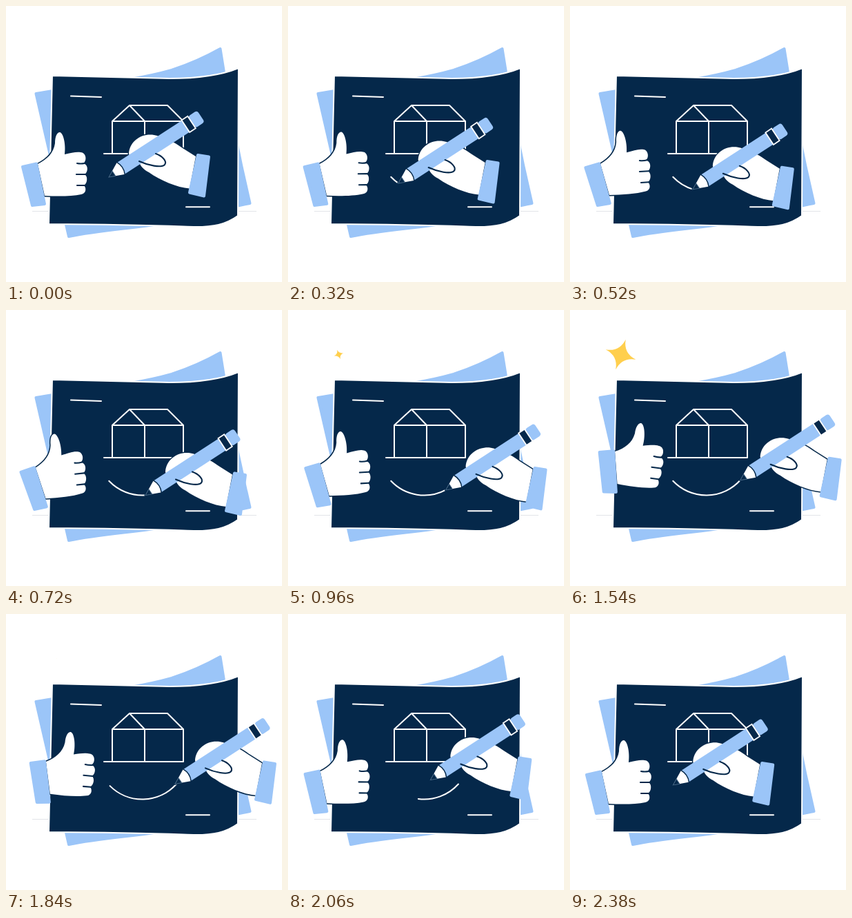
Animation of 400 by 400 pixels, one loop 2400 ms. Source, as an HTML page:

```html
<!DOCTYPE html>
<html lang="en">
<head>
<meta charset="utf-8">
<title>Drafting a house</title>
<style>
  html, body { margin: 0; width: 100%; height: 100%; overflow: hidden; background: #fff; }
  svg { display: block; width: 100%; height: 100%; }
  .blue { fill: #9bc5f8; }
  .navy { fill: #05284a; }
  .round { stroke: #9bc5f8; stroke-width: 4; stroke-linejoin: round; }
  .chalk { fill: none; stroke: #fff; stroke-width: 2; stroke-linecap: round; stroke-linejoin: round; }
  .skin { fill: #fff; stroke: #05284a; stroke-width: 3; stroke-linejoin: round; paint-order: stroke; }
  .ink { fill: none; stroke: #05284a; stroke-width: 2.1; stroke-linecap: round; }
</style>
</head>
<body>
<svg viewBox="0 0 400 400">
  <path d="M38 297.5H363" stroke="#e2e4e8"/>

  <!-- sheets -->
  <path class="blue round" d="M43.5 127C110 115 180 110 240 93C267 84 291 73 310.5 62Q328 178 353.5 286C320 292 280 303 240 313C190 322 140 324 91 334Z"/>
  <path class="navy" stroke="#fff" stroke-width="2" d="M67 101L237 105C275 105 310 101 337 90L336 304C318 317 300 320 275 320C240 319 200 317 62 316Z"/>

  <!-- plan -->
  <path class="chalk" d="M94 130.5L138 132M261 291.3H295M142 214H257V167L234 144H179L154 167V214M154 167H257M179 144L201 167V214"/>
  <path class="chalk" id="arc"/>

  <g id="thumbHand">
    <path class="skin" d="M46 229C60 222 69 213 71 199C71 189 74 183 78 183C83 184 87 200 85 215C94 213 102 211 108 212C116 212 118 224 112 228C120 230 119 241 114 244C119 247 118 257 113 260C117 264 116 272 109 273C95 276 75 276 56 275Z"/>
    <path class="ink" d="M103 228Q108 229 114 228M102 244H115M103 260H114"/>
    <path class="blue round" d="M24 233L44 228.5L56 287L38 289Z"/>
  </g>

  <g id="penHand">
    <path class="skin" d="M178 214C179 199 191 188 206 186.5C216 186 222 188 226 193C236 192 248 200 256 206L275 218L266 264.5C248 263 224 253 207 241C199 237 194 231 192 224C186 222 179 220 178 214Z"/>
    <g transform="translate(149 248) rotate(-33.5)">
      <path class="blue" d="M21 -11L134 -10V10L21 9Z"/>
      <path class="skin" d="M0 0L21 -11Q26 -1 21 9Z"/>
      <path class="navy" stroke="#41617f" d="M0 0L9 -4.5V4Z"/>
      <rect class="blue" x="144" y="-10" width="16" height="20" rx="4"/>
      <rect class="navy" x="133.5" y="-10.5" width="10.5" height="21" stroke="#fff" stroke-width="1.8"/>
    </g>
    <path class="ink" d="M217 214C226 217 234 225 230 230C225 235 206 231 193 225"/>
    <path class="blue round" d="M278 216L294 218.5L287 275.5L266 270.5Z"/>
  </g>

  <path id="star" fill="#ffcf4d" d="M0 -23Q3 -3 23 0Q3 3 0 23Q-3 3 -23 0Q-3 -3 0 -23Z"/>
</svg>
<script>
const LOOP = 2400;
const el = id => document.getElementById(id);
const arc = el('arc'), thumbHand = el('thumbHand'), penHand = el('penHand'), star = el('star');

// Eased progress from 0 to 1 between two times
function ease(t, start, end) {
  const u = Math.min(1, Math.max(0, (t - start) / (end - start)));
  return (1 - Math.cos(Math.PI * u)) / 2;
}

// Point on the drawn curve
function curve(p) {
  const a = (136.5 - 94.5 * p) * Math.PI / 180;
  return [197.5 + 66.5 * Math.cos(a), 202 + 66.5 * Math.sin(a)];
}

function render(t) {
  const drawn = ease(t, 0, 1380), back = ease(t, 1790, 2400);
  const [x0, y0] = curve(0), [x, y] = curve(drawn);
  const dx = (x - x0) * (1 - back);
  const dy = (y - y0) * (1 - back) - 7 * Math.sin(Math.PI * back);
  penHand.setAttribute('transform', `translate(${dx} ${dy})`);
  arc.setAttribute('d', drawn - back > 0.002 ? `M${curve(back)}A66.5 66.5 0 0 0 ${x} ${y}` : '');

  const home = 1 - ease(t, 1640, 2120);
  const lift = ease(t, 840, 1260) * home;
  const tilt = (-6 * ease(t, 200, 760) + 14 * ease(t, 760, 1480)) * home;
  thumbHand.setAttribute('transform', `translate(${15 * lift} ${-25 * lift}) rotate(${tilt} 40 258.5)`);

  const size = ease(t, 860, 1130) - ease(t, 1560, 1860);
  const turn = 38 + (t - 1220) * 0.219;
  star.setAttribute('transform', `translate(73.5 64.5) rotate(${turn}) scale(${size})`);
}

const begin = performance.now();
function tick() {
  render((performance.now() - begin) % LOOP);
  requestAnimationFrame(tick);
}
tick();
</script>
</body>
</html>
```
